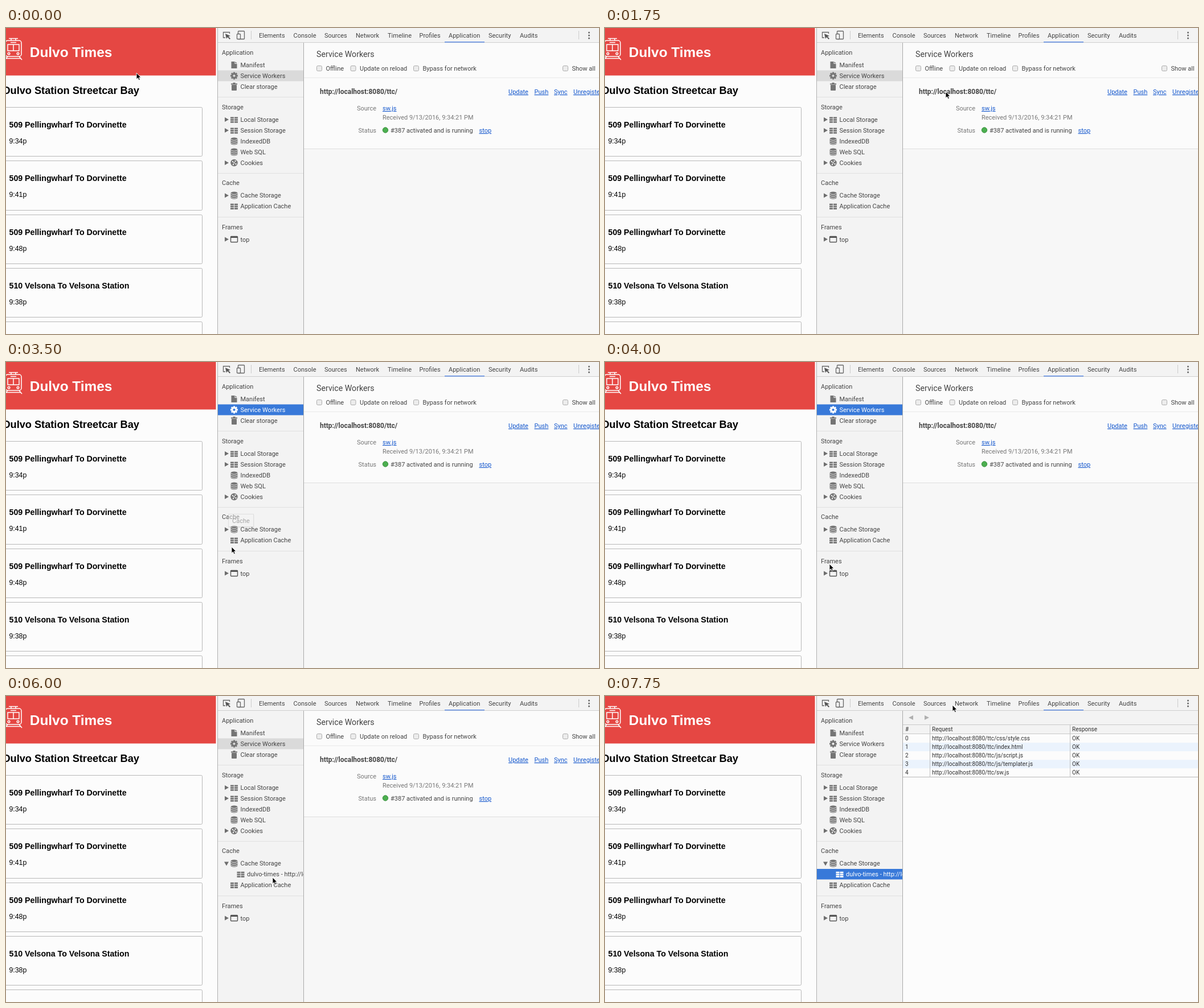
An HTML page that plays this animation: 1041x538 px, repeating every 8000 ms.

```html
<!DOCTYPE html>
<html lang="en">
<head>
<meta charset="utf-8">
<title>Service worker cache demo</title>
<style>
html, body { margin: 0; width: 100%; height: 100%; overflow: hidden; background: #fcfcfc; }
svg { display: block; width: 1041px; height: 538px; }
text { font: 11px Roboto, Inter, sans-serif; fill: #444; white-space: pre; }
.page text { font: bold 14.18px "Liberation Sans", Arial, sans-serif; fill: #000; }
.page .title { font-size: 24.4px; fill: #fff; }
.page .heading { font-size: 18.2px; }
.page .time { font-weight: normal; font-size: 12.3px; }
.panel-title { font-size: 14.2px; }
.origin { font-size: 12px; font-weight: bold; }
.muted { fill: #777; }
.link { fill: #1155cc; text-decoration: underline; }
.table text { font-size: 10px; fill: #303030; }
.icon { color: #757575; }
.selected text { fill: #fff; }
.selected .icon { color: #fff; }
</style>
</head>
<body>
<svg id="stage" viewBox="0 0 1041 538" xmlns="http://www.w3.org/2000/svg"></svg>
<script>
const rect = (x, y, w, h, fill, extra = "") =>
  `<rect x="${x}" y="${y}" width="${w}" height="${h}" fill="${fill}" ${extra}/>`;
const text = (x, y, label, cls = "", extra = "") =>
  `<text x="${x}" y="${y}" class="${cls}" ${extra}>${label}</text>`;
const path = (d, extra = "") => `<path d="${d}" ${extra}/>`;
const hline = (x, y, w, color) => rect(x, y, w, 1, color);
const vline = (x, y, h, color) => rect(x, y, 1, h, color);
const group = (id, content) => `<g id="${id}">${content}</g>`;

// Icons are centred on the origin and take the current colour.
const gearTeeth = [0, 45, 90, 135].map(a =>
  rect(-1.5, -6.5, 3, 13, "currentColor", `transform="rotate(${a})"`)).join("");
const icons = {
  file: path("M-5-6H1V-2H5V6H-5Z M2-6L5-3H2Z", 'fill="currentColor"'),
  gear: gearTeeth + '<circle r="3.5" fill="none" stroke="currentColor" stroke-width="2.6"/>' +
    '<circle class="hub" r="2.1" fill="#dadada"/>',
  trash: rect(-5.5, -5.5, 11, 2, "currentColor") + rect(-2, -7, 4, 2, "currentColor") +
    rect(-4.5, -3, 9, 10, "currentColor", 'rx="1"'),
  grid: [-4.5, -.8, 2.9].map(y => rect(-6.5, y, 6, 2.8, "currentColor") +
    rect(.5, y, 6, 2.8, "currentColor")).join(""),
  db: path("M-6-4A6 2.5 0 0 1 6-4V4A6 2.5 0 0 1-6 4Z", 'fill="currentColor"') +
    [-3.5, -.2, 3.1].map(y => path(`M-6 ${y}Q0 ${y + 4} 6 ${y}`,
      'fill="none" stroke="#f3f3f3" stroke-width=".9"')).join(""),
  cookie: '<circle r="6.2" fill="currentColor"/>' +
    [[-2.5, -2], [2, -3], [3, 2], [-1.5, 3], [0, 0], [5, -5]].map(([x, y]) =>
      `<circle cx="${x}" cy="${y}" r="1.2" fill="#f3f3f3"/>`).join(""),
  frame: rect(-6, -5, 12, 10, "none", 'rx="1" stroke="#555" stroke-width="1.4"') +
    rect(-6, -5, 12, 2.5, "#555")
};
const icon = (name, x, y) =>
  `<g class="icon" transform="translate(${x} ${y})">${icons[name]}</g>`;
const arrow = (y, id = "") =>
  path("M-3-4L4 0L-3 4Z", `id="${id}" transform="translate(387 ${y})" fill="#6e6e6e"`);
const row = (name, y, label, indent = 0) =>
  icon(name, 400.5 + indent, y) + text(411.5 + indent, y + 4, label);

function webPage() {
  const cards = [
    ["509 Pellingwharf To Dorvinette", "9:34p"],
    ["509 Pellingwharf To Dorvinette", "9:41p"],
    ["509 Pellingwharf To Dorvinette", "9:48p"],
    ["510 Velsona To Velsona Station", "9:38p"],
    ["", ""]
  ];
  const train = `<g fill="none" stroke="#fff" stroke-width="1.5">
    <path d="M5 18.5H21M9 19V22M17 19V22M3 50L-2 56M23 50L28 56M0 53.5H26"/>
    <rect x="-1" y="22" width="28" height="28" rx="4"/>
    <path d="M3 29H23V40H3ZM13 29V40M8 25.5H18"/>
    <circle cx="5" cy="45" r="1.8"/><circle cx="21" cy="45" r="1.8"/></g>`;
  return `<g class="page">` + rect(0, 0, 371, 538, "#fcfcfc") +
    rect(0, 0, 368.5, 83.5, "#e54743") + train +
    text(41.8, 51, "Dulvo Times", "title") +
    text(-5.6, 116, "Dulvo Station Streetcar Bay", "heading") +
    cards.map(([route, time], i) => {
      const top = Math.round(i * 94.3), bottom = Math.round(i * 94.3 + 86.3);
      const y = 139.5 + top;
      return rect(-8.5, y, 353, bottom - top, "none", 'rx="2" stroke="#b8b8b8"') +
        text(5.5, y + 35.5, route) + text(5.5, y + 63.5, time, "time");
    }).join("") + "</g>";
}

function toolbar() {
  const tabs = [[444, "Elements"], [504.5, "Console"], [559, "Sources"], [614, "Network"],
    [670, "Timeline"], [725.5, "Profiles"], [777, "Application"], [847, "Security"], [902, "Audits"]];
  return rect(372, 0, 669, 26, "#f3f3f3") + hline(372, 25, 669, "#cfcfcf") +
    path("M385 17H381.5V7.5H392.5V10", 'fill="none" stroke="#666" stroke-width="1.3"') +
    path("M385 10L394 14L390.5 15L394 18.5L392.5 20L389 16L387 19Z", 'fill="#555"') +
    rect(407.5, 5.5, 11, 14, "none", 'rx="1" stroke="#666" stroke-width="1.3"') +
    rect(405.5, 10.5, 6, 9, "#f3f3f3", 'rx="1" stroke="#666" stroke-width="1.3"') +
    vline(430, 5, 15, "#ccc") + vline(1005, 5, 15, "#ccc") +
    tabs.map(([x, label]) => text(x, 17, label)).join("") +
    rect(770, 24, 70, 1.3, "#4c82e6") +
    [8, 13, 18].map(y => `<circle cx="1023.5" cy="${y}" r="1.5" fill="#666"/>`).join("");
}

function sidebar() {
  const separator = y => hline(372, y, 150, "#e0e0e0");
  return rect(372, 26, 150, 512, "#f3f3f3") +
    text(379, 47, "Application") + row("file", 65, "Manifest") +
    group("workers", rect(372, 74.5, 150, 19, "#dadada") + row("gear", 84, "Service Workers")) +
    row("trash", 103, "Clear storage") + separator(121) +
    text(379, 143, "Storage") + arrow(161) + row("grid", 161, "Local Storage") +
    arrow(180) + row("grid", 180, "Session Storage") +
    row("db", 199, "IndexedDB") + row("db", 218, "Web SQL") +
    arrow(237) + row("cookie", 237, "Cookies") + separator(255) +
    text(379, 276, "Cache") + arrow(294.5, "cacheArrow") + row("db", 294.3, "Cache Storage") +
    `<g id="cacheEntry" clip-path="url(#sideClip)">` + rect(372, 304, 150, 18.5, "#3879d9") +
    row("grid", 313.3, "dulvo-times - http://localhost:8080", 11.5) + "</g>" +
    group("lower", row("grid", 313.3, "Application Cache") + separator(332) +
      text(379, 354, "Frames") + arrow(371.5) + row("frame", 371.5, "top"));
}

function workerPanel() {
  const check = (x, label) =>
    rect(x + .5, 66.5, 9, 9, "#ececec", 'rx="2" stroke="#acacac"') + text(x + 16.5, 75, label);
  const links = [[882, "Update"], [927.5, "Push"], [962, "Sync"], [996, "Unregister"]];
  const right = 'text-anchor="end"';
  return rect(523, 26, 518, 512, "#f7f7f7") + rect(523, 26, 518, 186, "#fbfbfb") +
    hline(523, 87, 518, "#e9e9e9") + hline(523, 212, 518, "#dedede") +
    text(545, 51, "Service Workers", "panel-title") +
    check(545, "Offline") + check(604.5, "Update on reload") +
    check(715, "Bypass for network") + check(977, "Show all") +
    text(551, 116, "http://localhost:8080/ttc/", "origin") +
    links.map(([x, label]) => text(x, 116, label, "link")).join("") +
    text(650, 145, "Source", "muted", right) + text(661, 145, "sw.js", "link") +
    text(661, 160.5, "Received 9/13/2016, 9:34:21 PM", "muted") +
    text(650, 184, "Status", "muted", right) +
    '<circle cx="666" cy="179.5" r="4.7" fill="#4caf50" stroke="#3c9140"/>' +
    text(675, 184, "#387 activated and is running") + text(830.5, 184, "stop", "link");
}

function cacheTable() {
  const files = ["css/style.css", "index.html", "js/script.js", "js/templater.js", "sw.js"];
  const cells = (y, values) =>
    [527, 574, 820].map((x, i) => text(x, y, values[i])).join("");
  return `<g class="table">` + rect(523, 26, 518, 512, "#fcfcfc") +
    rect(523, 26, 518, 41, "#f3f3f3") + hline(523, 50, 518, "#c8c8c8") +
    path("M541 34L533 38L541 42Z M561 34L569 38L561 42Z", 'fill="#b0b0b0"') +
    cells(61.5, ["#", "Request", "Response"]) +
    files.map((file, i) => rect(523, 67 + i * 15.1, 518, 15.1, i % 2 ? "#ebf3fd" : "#fcfcfc") +
      cells(78 + i * 15.1, [i, "http://localhost:8080/ttc/" + file, "OK"])).join("") +
    hline(523, 66, 518, "#c8c8c8") + hline(523, 142, 518, "#b8b8b8") +
    vline(570, 51, 92, "#c0c0c0") + vline(816, 51, 92, "#c0c0c0") + "</g>";
}

const tooltip = (id, x, y, w, label) => group(id,
  rect(x + .5, y + 1.5, w, 23, "#000", 'opacity=".12"') +
  rect(x + .5, y + .5, w - 1, 22, "#f5f5f5", 'stroke="#c9c9c9"') + text(x + 7, y + 15.5, label));

const stage = document.getElementById("stage");
stage.innerHTML =
  '<defs><clipPath id="sideClip"><rect x="372" y="26" width="150" height="512"/></clipPath></defs>' +
  webPage() + group("workerPanel", workerPanel()) + group("cacheTable", cacheTable()) +
  sidebar() + toolbar() + vline(371, 0, 538, "#b0b0b0") + vline(522, 26, 512, "#a9a9a9") +
  tooltip("workersTip", 428, 85, 88, "Service Workers") + tooltip("cacheTip", 390, 267, 45, "Cache") +
  group("cursor", path("M0 0V11.2L2.6 8.8L4.3 12.7L6.3 11.8L4.6 8H8Z",
    'fill="#000" stroke="#fff" stroke-width=".9"'));

const el = id => document.getElementById(id);
const show = (id, opacity) => el(id).setAttribute("opacity", Number(opacity));
const STEP = 250, LOOP = 8000;

const pointer = [
  [229, 79], [330, 98], [352, 113], [602, 138], [820, 80], [855, 32],
  [800, 20], [598, 112], [362, 112], [417, 83], [417, 83],
  [414, 150], [394, 262], [394, 262], [396, 325], [391, 345],
  [394, 355], [540, 300], [677, 48], [440, 290], [383, 295],
  [383, 295], [383, 295], [440, 312], [468, 319], [468, 319],
  [468, 319], [468, 319], [560, 280], [700, 190], [814, 104], [610, 16]
];

function draw(time) {
  const step = Math.floor((time % LOOP) / STEP), now = step * STEP;
  const focused = now >= 2250 && now < 5250;
  const expanded = now >= 5250, opened = now >= 6500;

  const workers = el("workers"), marker = workers.querySelector("rect");
  const rowColor = focused ? "#3879d9" : opened ? "#f3f3f3" : "#dadada";
  workers.classList.toggle("selected", focused);
  marker.setAttribute("fill", rowColor);
  workers.querySelector(".hub").setAttribute("fill", rowColor);

  show("cacheEntry", expanded);
  show("workerPanel", !opened);
  show("cacheTable", opened);
  el("cacheEntry").classList.toggle("selected", opened);
  el("cacheEntry").querySelector("rect").setAttribute("opacity", Number(opened));
  el("lower").setAttribute("transform", `translate(0 ${expanded ? 19 : 0})`);
  el("cacheArrow").setAttribute("transform", `translate(387 294.5) rotate(${expanded ? 90 : 0})`);

  show("workersTip", now === 2500);
  show("cacheTip", now === 3250 ? 1 : now === 3500 ? .45 : 0);
  el("cursor").setAttribute("transform", `translate(${pointer[step].join(" ")})`);
}

function tick() {
  draw(performance.now());
  requestAnimationFrame(tick);
}
tick();
</script>
</body>
</html>
```
